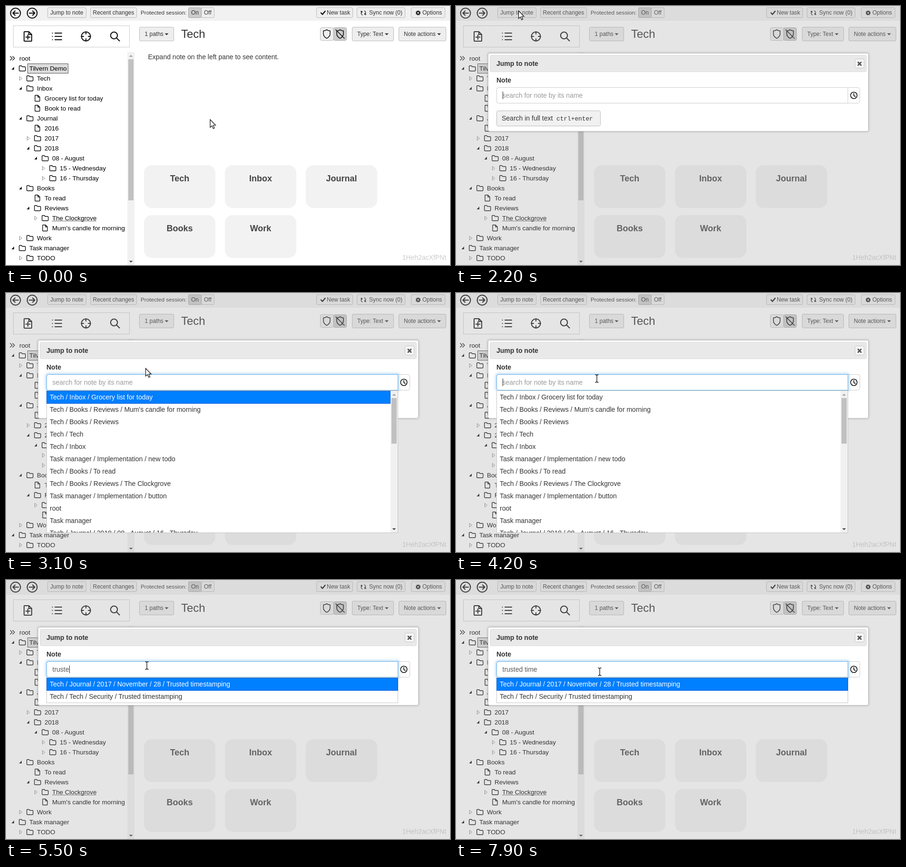
Recreate the animation shown at these times as an HTML page. Size 933 by 545 pixels, loop 8000 ms.

```html
<!DOCTYPE html>
<html lang="en">
<head>
<meta charset="utf-8">
<title>Jump to note</title>
<style>
html, body { margin: 0; width: 100%; height: 100%; overflow: hidden; background: #fff; }
svg { display: block; width: 933px; height: 545px; font-family: "Liberation Sans", Arial, sans-serif; }
text { white-space: pre; }
.line { fill: none; stroke: #111; stroke-linejoin: round; stroke-linecap: round; }
</style>
</head>
<body>
<svg id="stage" viewBox="0 0 933 545"></svg>
<script>
const stage = document.getElementById('stage');
const LOOP = 8000;

// ---- markup helpers ----
const text = (x, y, s, size, fill = '#333', more = '') =>
  `<text x="${x}" y="${y}" font-size="${size}" fill="${fill}" ${more}>${s}</text>`;
const rect = (x, y, w, h, fill, more = '') =>
  `<rect x="${x}" y="${y}" width="${w}" height="${h}" fill="${fill}" ${more}/>`;
// bordered box given by its outer edges
const box = (x1, y1, x2, y2, fill, border, r = 0) =>
  rect(x1 + .5, y1 + .5, x2 - x1 - 1, y2 - y1 - 1, fill, `stroke="${border}" rx="${r}"`);
const fillPath = (d, fill, x = 0, y = 0) =>
  `<path d="${d}" fill="${fill}" transform="translate(${x} ${y})"/>`;
const line = (d, w = 1.5, x = 0, y = 0, more = '') =>
  `<path class="line" d="${d}" stroke-width="${w}" transform="translate(${x} ${y})" ${more}/>`;
const group = (id, body) => `<g id="${id}">${body}</g>`;
const circle = r => `M${-r} 0a${r} ${r} 0 1 0 ${2 * r} 0a${r} ${r} 0 1 0 ${-2 * r} 0`;
const button = (x1, y1, x2, y2, label, tx, ty) =>
  box(x1, y1, x2, y2, '#eee', '#bbb', 2.5) + text(tx, ty, label, 12);
const caretDown = (x, y) => fillPath('M0 0h8l-4 4z', '#333', x, y);

function scrollbar(x, y1, y2, thumb1, thumb2) {
  return rect(x, y1, 15, y2 - y1, '#f1f1f1')
    + rect(x + 2, thumb1, 11, thumb2 - thumb1, '#c1c1c1')
    + fillPath('M-4 2h8l-4-4z', '#a3a3a3', x + 7.5, y1 + 8)
    + fillPath('M-4 -2h8l-4 4z', '#505050', x + 7.5, y2 - 7);
}

// ---- main window ----
function toolbar() {
  let s = rect(0, 0, 933, 31, '#f1f1f1');
  s += line(circle(10.4), 2, 20, 15) + line('M6 0H-5M-1-4.5L-5.5 0L-1 4.5', 2.2, 20, 15);
  s += line(circle(10.4), 2, 55, 15) + line('M-6 0H5M1-4.5L5.5 0L1 4.5', 2.2, 55, 15);
  s += button(87, 3, 169, 25, 'Jump to note', 93, 18);
  s += button(177, 3, 275, 25, 'Recent changes', 182.5, 18);
  s += text(283, 18, 'Protected session:', 11.7);
  s += button(410, 3, 438, 25, 'Off', 416, 18);
  s += box(383, 3, 411, 25, '#ccc', '#a5a5a5', 2) + text(389, 18, 'On', 12);
  s += button(652, 3, 729, 25, 'New task', 674, 18);
  s += line('M-4 0l3 3.2L4.500-3.500', 2.4, 666, 14.5);
  s += button(737, 3, 839, 25, 'Sync now (0)', 763, 18);
  s += line('M-2 4.500A4.500 4.500 0 0 1-3.300-3M-5.500-3.400h2.700v2.700M2-4.500A4.500 4.500 0 0 1 3.300 3M5.500 3.400H2.800V.7', 1.2, 751, 14.5);
  s += button(851, 3, 923, 25, 'Options', 875, 18);
  s += `<circle cx="866" cy="14.500" r="2.900" fill="none" stroke="#222" stroke-width="2.400"/>`
    + `<circle cx="866" cy="14.500" r="4.400" fill="none" stroke="#222" stroke-width="1.800" stroke-dasharray="1.728"/>`;
  return s;
}

const FOLDER = 'M.7 2.2q0-1.500 1.500-1.500h3.300l1.600 2h5.200q1.500 0 1.500 1.500v6q0 1.500-1.500 1.500h-10.100q-1.500 0-1.500-1.500z';
const DOC = 'M2 .7h5l4 4v7.800q0 1-1 1h-8q-1 0-1-1v-10.800q0-1 1-1zM7 .7v4h4';
// depth, kind (o open, c closed, d document), label
const TREE = [
  [1, 'o', 'Tilvern Demo'], [2, 'c', 'Tech'], [2, 'o', 'Inbox'],
  [3, 'd', 'Grocery list for today'], [3, 'd', 'Book to read'], [2, 'o', 'Journal'],
  [3, 'd', '2016'], [3, 'c', '2017'], [3, 'o', '2018'], [4, 'o', '08 - August'],
  [5, 'c', '15 - Wednesday'], [5, 'c', '16 - Thursday'], [2, 'o', 'Books'],
  [3, 'd', 'To read'], [3, 'o', 'Reviews'], [4, 'c', 'The Clockgrove'],
  [4, 'd', 'Mum\'s candle for morning'], [2, 'c', 'Work'], [1, 'o', 'Task manager'],
  [2, 'c', 'TODO'], [2, 'c', '']
];

function treeRow([depth, kind, label], i) {
  const x = 33 + 16 * depth, y = 131 + 21 * i;
  let s = '';
  if (kind === 'd') s += line(DOC, 1.4, x - 21, y - 7);
  else s += line(FOLDER, 1.4, x - 22, y - 6);
  if (kind === 'o') s += fillPath('M0 6h5.500v-6z', '#111', x - 37.5, y - 3);
  if (kind === 'c') s += `<path d="M${x - 36.5} ${y - 3.5}v8l5-4z" fill="#fff" stroke="#888"/>`;
  return s + text(x, y + 5, label, 13.333, '#000');
}

function sidebar() {
  let s = box(15, 41, 260, 87, '#fff', '#ccc');
  s += line('M-8-9q0-1 1-1h9l6 6v13q0 1-1 1h-14q-1 0-1-1zM2-10v6h6M0-3v9M-4.500 1.500h9', 2, 46, 64);
  s += line('M-4-7H10M-4 0H10M-4 7H10M-9.500-7h.1M-9.500 0h.1M-9.500 7h.1', 2, 107, 64);
  s += line(circle(9.5) + 'M0-10v5M0 10v-5M-10 0h5M10 0h-5', 2, 168, 64);
  s += line(circle(7.2) + 'M5.500 5.500L11.500 11.500', 2.1, 227, 62);
  s += line('M9 106l4 4l-4 4M14 106l4 4l-4 4', 1.4);
  s += text(28, 115, 'root', 13.333, '#000');
  s += box(45, 121, 131, 142, '#ddd', '#555');
  s += TREE.map(treeRow).join('');
  s += line('M97 452.500H190', 1, 0, 0, 'stroke-dasharray="1.500 1" style="stroke-linecap:butt"');
  return s + scrollbar(255, 97, 545, 112, 409);
}

const SHIELD = 'M0-9q3.500 2.300 7 2.300v6.200q0 6-7 9.500q-7-3.500-7-9.500v-6.200q3.500 0 7-2.300z';

function note() {
  let s = button(280, 44, 353, 74, '1 paths', 291.5, 63) + caretDown(333.5, 57.5);
  s += text(368, 67, 'Tech', 24);
  s += box(660, 45, 689, 73, '#eee', '#bbb', 3) + line(SHIELD, 1.5, 674, 59);
  s += box(688, 45, 716, 73, '#ccc', '#aaa', 3) + line(SHIELD + 'M-9-9L9 9', 1.6, 702, 59);
  s += button(727, 44, 815, 74, 'Type: Text', 738, 63) + caretDown(796, 57.5);
  s += button(825, 44, 925, 74, 'Note actions', 836, 63) + caretDown(906, 57.5);
  s += text(298.5, 112, 'Expand note on the left pane to see content.', 14);
  ['Tech', 'Inbox', 'Journal', 'Books', 'Work'].forEach((name, i) => {
    const x = 290 + 170 * (i % 3), y = i < 3 ? 335 : 440;
    s += rect(x, y, 150, 90, '#f2f2f2', 'rx="16"')
      + text(x + 75, y + 34, name, 18, '#444', 'font-weight="bold" text-anchor="middle"');
  });
  return s + text(832.5, 534, '1Heh2acXfPNt', 14, '#ccc');
}

// ---- dialog ----
function dialog() {
  let s = rect(67, 99, 800, 165, '#666', 'rx="3" filter="url(#soft)" opacity=".45"');
  s += box(67, 99, 867, 264, '#fff', '#c5c5c5', 3);
  s += box(71, 103, 863, 139, '#e9e9e9', '#ddd', 3);
  s += text(85, 126, 'Jump to note', 14, '#333', 'font-weight="bold"');
  s += box(838, 111, 858, 131, '#f6f6f6', '#c5c5c5', 3)
    + line('M-3-3L3 3M3-3L-3 3', 3, 848, 121.5, 'style="stroke:#555"');
  s += text(85, 161, 'Note', 14, '#333', 'font-weight="bold"');
  s += box(820, 171, 849, 205, '#fff', '#ccc', 4)
    + line(circle(6.8) + 'M0-4V.5L3 2.500', 1.6, 836, 188);
  s += box(85, 220, 304, 253, '#f1f1f1', '#bbb', 3);
  s += text(96, 241, 'Search in full text', 14);
  s += text(211, 241, 'ctrl+enter', 12.8, '#333', 'font-family="Liberation Mono, monospace"');
  const field = 'M823.500 171.500H89.500q-4 0-4 4V200.500q0 4 4 4H823.500z';
  s += `<path id="glow" d="${field}" fill="none" stroke="#66afe9" stroke-width="5" opacity=".5" filter="url(#soft)"/>`;
  s += `<path id="field" d="${field}" fill="#fff"/>`;
  s += text(97.5, 193, 'search for note by its name', 14, '#999', 'id="hint"');
  s += text(97.5, 193, '', 14, '#555', 'id="typed"');
  return s + rect(98, 180, 1, 16, '#222', 'id="caret"');
}

const rows = (list, first = '#333') =>
  list.map((s, i) => text(92, 224 + 26 * i, s, 14, i ? '#333' : first, i ? '' : 'class="first"')).join('');
const marker = right => box(85, 206, right, 233, '#007fff', '#0b5fd0');

function fullMenu() {
  const list = ['Tech / Inbox / Grocery list for today',
    'Tech / Books / Reviews / Mum\'s candle for morning', 'Tech / Books / Reviews',
    'Tech / Tech', 'Tech / Inbox', 'Task manager / Implementation / new todo',
    'Tech / Books / To read', 'Tech / Books / Reviews / The Clockgrove',
    'Task manager / Implementation / button', 'root', 'Task manager',
    'Tech / Journal / 2018 / 08 - August / 16 - Thursday'];
  return box(85, 205, 824, 505, '#fff', '#c5c5c5')
    + group('marker', marker(808))
    + `<g clip-path="url(#menuClip)">${rows(list)}</g>`
    + scrollbar(808, 206, 504, 221, 317);
}

const shortMenu = () => box(85, 205, 824, 259, '#fff', '#c5c5c5') + marker(824)
  + rows(['Tech / Journal / 2017 / November / 28 / Trusted timestamping',
    'Tech / Tech / Security / Trusted timestamping'], '#fff');

const tooltip = () => rect(141, 28, 66, 26, '#000', 'filter="url(#soft)" opacity=".3"')
  + rect(141, 26, 66, 26, '#111')
  + text(149, 44.5, 'CTRL+J', 15, '#fff', 'style="font-family:\'Noto Sans\',\'Open Sans\',sans-serif"');

const pointers = () =>
  group('arrow', '<path d="M0 0V16.500L3.800 13L6.400 19L9 17.900L6.500 12H11.500Z" fill="#fff" stroke="#111" stroke-width="1.200"/>')
  + group('beam', line('M-3-8q3 0 3 2v12q0 2-3 2M3-8q-3 0-3 2v12q0 2 3 2', 1.3))
  + group('hand', '<path d="M0 1q1.500-2 3 0l3 6.500q1-1.500 2.500-.3q1-1.300 2.600 0q1.200-1 2.400.5l1.800 5.500q.5 2-.5 3.500v2.300h-8.300v-1.500l-5.500-3.700q-1.300-1.300.2-2.100q1-.4 3 .8z" fill="#444" stroke="#eee" stroke-width=".8"/>');

stage.innerHTML = `<defs>
  <filter id="soft" x="-10%" y="-40%" width="120%" height="180%"><feGaussianBlur stdDeviation="2.5"/></filter>
  <clipPath id="menuClip"><rect x="86" y="206" width="722" height="298"/></clipPath></defs>`
  + rect(0, 0, 933, 545, '#fff') + toolbar() + sidebar() + note()
  + group('modal', rect(0, 0, 933, 545, '#aaa', 'opacity=".3"') + dialog()
    + group('fullMenu', fullMenu()) + group('shortMenu', shortMenu()))
  + group('tooltip', tooltip()) + pointers();

// ---- timeline ----
const $ = id => document.getElementById(id);
const show = (id, on) => $(id).setAttribute('display', on ? 'inline' : 'none');

const PHRASE = 'trusted time';
const KEYS = [4300, 4600, 4700, 5000, 5300, 5500, 5700, 6400, 6700, 6800, 6900, 7100];
const BLINKS = [2300, 4200, ...KEYS];

// the pointer jumps between these: time, shape, x, y
const TRACK = [
  [0, 'arrow', 429, 239], [500, 'beam', 429.5, 241], [700, 'beam', 424, 236],
  [800, 'beam', 395, 208], [900, 'beam', 338, 156], [1000, 'arrow', 272, 98],
  [1100, 'hand', 227, 57], [1300, 'hand', 184, 37], [1500, 'hand', 127, 12],
  [2200, 'arrow', 131.5, 10], [2600, 'arrow', 150, 27], [2700, 'arrow', 202, 75],
  [2800, 'arrow', 258, 126], [2900, 'arrow', 289, 155], [3100, 'arrow', 293.5, 158.5],
  [3200, 'beam', 295, 172], [3300, 'beam', 296, 177], [3400, 'beam', 296, 180],
  [7800, 'beam', 300, 188], [7900, 'beam', 302, 193]
];

function render(t) {
  const open = t >= 2200, focus = t >= 2300, filtered = t >= 5500, marked = t < 4200;
  show('modal', open);
  show('tooltip', t >= 1900 && !open);
  show('fullMenu', focus && !filtered);
  show('shortMenu', filtered);
  show('marker', marked);
  document.querySelector('#fullMenu .first').setAttribute('fill', marked ? '#fff' : '#333');
  show('glow', focus);
  $('field').setAttribute('stroke', focus ? '#66afe9' : '#ccc');

  const count = KEYS.filter(k => k <= t).length;
  $('typed').textContent = PHRASE.slice(0, count);
  show('hint', !count);
  const width = open && count ? $('typed').getComputedTextLength() : 0;
  $('caret').setAttribute('x', Math.round(97.8 + width));
  const last = BLINKS.filter(b => b <= t).pop() || t;
  show('caret', Math.floor((t - last) / 500) % 2 === 0);

  const [, shape, x, y] = TRACK.filter(p => p[0] <= t).pop();
  for (const id of ['arrow', 'beam', 'hand']) show(id, id === shape);
  $(shape).setAttribute('transform', `translate(${x} ${y})`);
}

const start = performance.now();
function tick() {
  render((performance.now() - start) % LOOP);
  requestAnimationFrame(tick);
}
tick();
</script>
</body>
</html>
```
